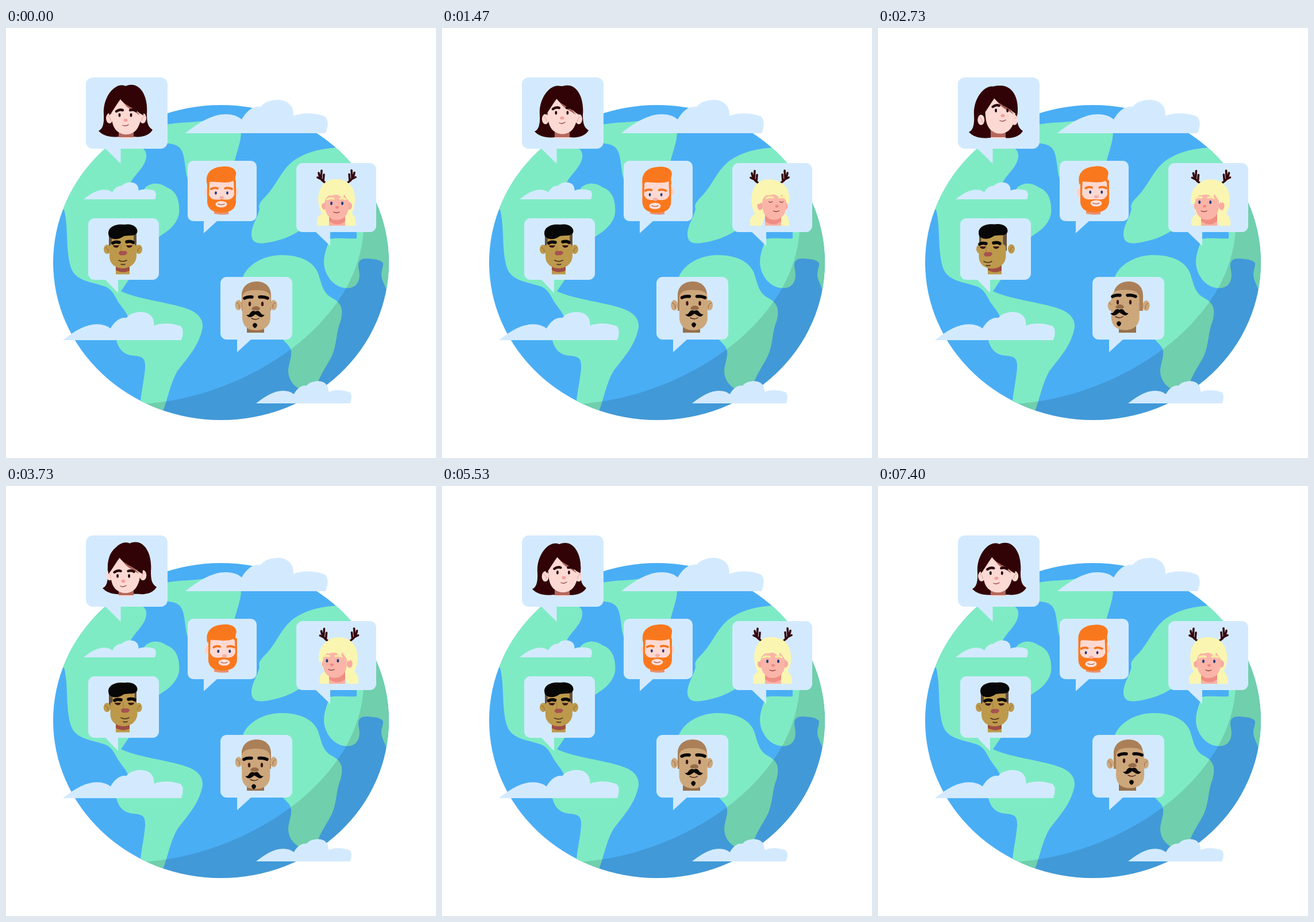
Write an HTML page that moves like this. It is 748x748 px and loops after 7430 ms.

```html
<!DOCTYPE html>
<html lang="en">
<head>
<meta charset="utf-8">
<title>People around the globe</title>
<style>
@property --x { syntax: "<number>"; inherits: true; initial-value: 0; }
@property --y { syntax: "<number>"; inherits: true; initial-value: 0; }
@property --h { syntax: "<number>"; inherits: true; initial-value: 0; }
@property --e { syntax: "<number>"; inherits: true; initial-value: 1; }

html, body { margin: 0; width: 100%; height: 100%; overflow: hidden; background: #fff; }
svg { display: block; width: 100%; height: 100%; }

/* x, y: where the head looks; h: hair shift; e: eye opening */
.head { animation: 7430ms ease-in-out infinite; }
.woman { animation-name: woman; }
.ginger { animation-name: ginger; }
.deer { animation-name: deer; }
.quiff { animation-name: quiff; }
.bald { animation-name: bald; }

/* d, v: how far a layer follows the look */
.layer { transform: translate(calc(var(--x) * var(--d) * 1px), calc(var(--y) * var(--v) * 1px)); }
.ears { --d: -.08; --v: -.35; }
.face { --d: .38; --v: .2; }
.eyes { --d: .85; --v: 1; }
.nose { --d: 1; --v: 1; }
.bald .eyes { --d: .5; }
.quiff .eyes { --d: .75; }
.hair { transform: translate(calc(var(--h) * 1px), calc(var(--y) * -.25px)); }
.open { opacity: var(--e); }
.shut { opacity: calc(1 - var(--e)); }
.line { fill: none; stroke-linecap: round; stroke-linejoin: round; }

@keyframes woman {
  0% { --x: 0; --y: 0; --h: 0; }
  9% { --x: 1; --y: -1; --h: -1; }
  19.8% { --x: 1; --y: -4; --h: 0; }
  28% { --x: 9; --y: -8; --h: -4; }
  36.7% { --x: 9; --y: -8; --h: -3; }
  43% { --x: 6; --y: -5; --h: -1; }
  50.2% { --x: -4; --y: 5; --h: 7; }
  58% { --x: -4; --y: 5; --h: 6.5; }
  65.5% { --x: -2.5; --y: 3; --h: 5; }
  74% { --x: 4; --y: -1; --h: -4; }
  79% { --x: 4; --y: -1; --h: -4; }
  85.2% { --x: 1.5; --y: 0; --h: 0; }
  99.6%, 100% { --x: -2; --y: 0; --h: 3; }
}
@keyframes ginger {
  0%, 8% { --x: 0; --y: 0; }
  17%, 23% { --x: -4; --y: 3; }
  31%, 40% { --x: 5; --y: -1.5; }
  50.2%, 56% { --x: 5; --y: .5; }
  63%, 67% { --x: -3; --y: -2.5; }
  76%, 90% { --x: 0; --y: 0; }
  97%, 100% { --x: -4; --y: 3; }
}
@keyframes deer {
  0%, 10% { --x: 0; --y: 0; --h: 0; --e: 1; }
  16% { --x: 6.5; --y: -2; --h: -5; }
  18% { --e: 1; }
  19.2%, 20.4% { --e: 0; }
  22% { --e: 1; }
  25% { --x: 6.5; --y: -2; --h: -5; }
  32%, 40% { --x: -8; --y: -2; --h: 4.5; }
  50.2%, 56% { --x: -9; --y: -1; --h: 4.5; }
  63%, 67% { --x: 0; --y: 3; --h: 0; }
  75%, 100% { --x: 0; --y: 0; --h: 0; --e: 1; }
}
@keyframes quiff {
  0%, 22% { --x: 0; --y: 0; --h: 0; }
  31%, 40% { --x: -12; --y: 2; --h: -3; }
  50.2% { --x: 4; --y: -1; --h: 0; }
  58%, 67% { --x: 9; --y: -2; --h: 0; }
  78%, 86% { --x: -3; --y: 0; --h: 0; }
  95%, 100% { --x: 0; --y: 0; --h: 0; }
}
@keyframes bald {
  0%, 7% { --x: 0; --y: 0; }
  17%, 23% { --x: 5; --y: -1; }
  31%, 40% { --x: -14; --y: -3; }
  50.2%, 56% { --x: -2; --y: 5.5; }
  64%, 68% { --x: 5; --y: 1.5; }
  78%, 88% { --x: 4; --y: -.5; }
  97%, 100% { --x: 8; --y: -2; }
}
</style>
</head>
<body>
<svg viewBox="0 0 748 748">
  <defs>
    <clipPath id="globe"><ellipse cx="374" cy="408" rx="292" ry="274"/></clipPath>
    <clipPath id="card"><rect x="505" y="235" width="139" height="109"/></clipPath>
    <path id="cloud" d="M0 0C25-20 48-33 70-33Q88-33 98-24Q112-48 131-46C138-55 150-58 162-58C180-57 189-46 188-30C205-37 228-35 243-29C250-22 248-10 244 0Z"/>
    <path id="antler" class="line" stroke="#35080d" stroke-width="3.6" d="M555 269C550 266 545 260 544 252M548 263L542 260M552 266L553 255M548 261L549 248"/>
  </defs>

  <g clip-path="url(#globe)">
    <path fill="#4aaef5" d="M80 130H670V690H80Z"/>
    <g fill="#7febc4">
      <path d="M90 316H101C109 345 103 385 113 417C121 440 146 441 170 449C185 453 189 467 197 479C205 491 220 505 212 520L192 543C196 560 206 569 222 570C239 571 243 576 242 592C240 615 235 632 233 660L270 690L274 664C282 642 286 618 298 597C316 573 336 553 342 521C343 500 327 492 308 486C275 476 235 473 200 458L262 366C280 354 296 345 301 323C303 302 297 283 279 277C264 266 244 270 239 283H218C207 264 240 250 244 225C245 213 239 206 225 207L190 180L80 250Z"/>
      <path d="M270 170C300 162 330 166 357 159L409 175C410 200 400 215 396 240H330L316 263C310 245 313 220 302 208C295 202 288 201 270 200Z"/>
      <path d="M580 208C545 209 520 217 500 231C482 245 475 263 460 283C451 296 437 303 441 315C438 330 426 345 427 360C428 376 441 376 457 373C478 369 495 363 515 350L560 340H610V366C594 367 576 364 563 367C559 380 553 392 553 408C554 430 569 449 588 452C608 455 618 442 614 421C611 408 614 401 627 401C640 402 651 402 656 409C656 419 650 426 655 439L662 456H690V208Z"/>
      <path d="M411 436C419 411 449 395 479 395C511 395 535 406 543 427C550 448 551 461 568 470C585 479 587 491 582 510C574 529 576 550 567 570C558 588 549 599 542 618L515 630C499 624 490 609 491 594C493 578 501 564 492 553L480 540L420 480Z"/>
    </g>
    <path fill="#000" opacity=".12" d="M236 654C340 648 440 605 513 545C580 488 616 425 622 354Q625 290 612 220H690V700H236Z"/>
  </g>

  <g fill="#d3eafe">
    <use href="#cloud" transform="translate(312 183)"/>
    <use href="#cloud" transform="translate(99 543) scale(.843)"/>
    <use href="#cloud" transform="translate(135 298) scale(.508)"/>
    <use href="#cloud" transform="translate(435 653) scale(.67)"/>
    <rect x="139" y="86" width="142" height="124" rx="12"/>
    <path d="M172 209L199.500 236V209Z"/>
    <rect x="316" y="231" width="120" height="105" rx="10"/>
    <path d="M344 335V357L368 335Z"/>
    <rect x="505" y="235" width="139" height="120" rx="11"/>
    <path d="M538 354L564 379V354Z"/>
    <rect x="143" y="331" width="123" height="107" rx="11"/>
    <path d="M172 437L195 461V437Z"/>
    <rect x="373" y="433" width="125" height="109" rx="11"/>
    <path d="M402 541V564L427 541Z"/>
  </g>

  <g class="head woman">
    <path class="hair" fill="#310306" d="M208 101C190 93 168 120 170 150C171 167 168 176 161 179C168 187 182 191 196 189H222C238 191 250 186 255 177C247 172 245 165 245 150C248 116 231 91 208 101Z"/>
    <path fill="#b5685d" d="M196 165H222V190H196Z"/>
    <path fill="#fbd8d3" d="M196 190H222V192H196Z"/>
    <g class="layer ears" fill="#fdd9d4">
      <ellipse cx="180" cy="157" rx="6" ry="9"/>
      <ellipse cx="238" cy="157" rx="6" ry="9"/>
      <path class="line" stroke="#dc9a94" d="M177 153Q182 155 182 161M241 153Q236 155 236 161"/>
    </g>
    <g class="layer face">
      <path fill="#fdd9d4" d="M183 135C183 158 184 172 194 180C203 187 215 187 224 180C233 172 236 158 236 135C230 110 189 110 183 135Z"/>
      <path fill="#a75f58" d="M200 123Q219 132 233 152L224 146Q208 139 200 123Z"/>
      <path fill="#310306" d="M180 152C187 143 192 133 199 124C207 135 222 138 232 148L239 152C243 122 229 101 209 102C187 99 174 126 180 152Z"/>
    </g>
    <g class="layer eyes">
      <path class="line" stroke="#2b0508" stroke-width="4.500" d="M192 145Q198 141 203 143M216 143Q221 141 226 144"/>
      <g fill="#25080c"><ellipse cx="197.500" cy="151.500" rx="1.900" ry="3.200"/><ellipse cx="217.500" cy="151.500" rx="1.900" ry="3.200"/></g>
    </g>
    <g class="layer nose">
      <ellipse cx="208" cy="160.500" rx="3.500" ry="2.700" fill="#f6a09b"/>
      <path class="line" stroke="#8f4744" stroke-width="1.300" d="M203 169Q208 172 213 168"/>
    </g>
  </g>

  <g class="head ginger">
    <path fill="#e99170" d="M362 308H387V324Q374 326 362 323Z"/>
    <g class="layer ears" fill="#fdd3ca">
      <ellipse cx="350" cy="285" rx="4" ry="7"/>
      <ellipse cx="400" cy="285" rx="4" ry="7"/>
    </g>
    <g class="layer face">
      <path fill="#fdd9d2" d="M351 260H399V302Q397 316 375 318Q353 316 351 302Z"/>
      <path fill="#fa781d" d="M350 265H354L353 290C357 300 364 299 375 298C386 299 393 300 397 290L396 265H400V301C400 315 390 321 375 321C360 321 350 315 350 301Z"/>
    </g>
    <path class="layer" style="--d:.1;--v:.2" fill="#fa781d" d="M350 273C345 254 356 242 377 241C391 239 402 246 400 255C399 260 398 262 400 272L395 266C383 272 362 266 354 268Z"/>
    <g class="layer eyes">
      <path class="line" stroke="#f4751f" stroke-width="3.800" d="M357 280Q362 277 368 279M381 279Q387 277 393 280"/>
      <g fill="#263b78"><ellipse cx="365" cy="287" rx="1.900" ry="2.800"/><ellipse cx="385" cy="287" rx="1.900" ry="2.800"/></g>
    </g>
    <g class="layer nose">
      <ellipse cx="375" cy="295" rx="4" ry="2.800" fill="#f5aea7"/>
      <ellipse cx="374.500" cy="306.500" rx="10" ry="5.500" fill="#fde0d8"/>
      <path class="line" stroke="#a85540" stroke-width="1.200" d="M369 306Q375 309 380 306"/>
    </g>
  </g>

  <g class="head deer" clip-path="url(#card)">
    <g class="hair">
      <use href="#antler"/>
      <use href="#antler" transform="matrix(-1 0 0 1 1150 -.5)"/>
      <path fill="#faf6b1" d="M575 263C551 261 540 284 544 307Q546 319 550 323C540 327 540 337 542 346H560L566 329H584L590 346H608C610 337 608 327 601 323Q606 314 607 303C609 280 597 263 575 263Z"/>
    </g>
    <path fill="#ef8d83" d="M562 320H590V346H562Z"/>
    <path fill="#f9b1a4" d="M562 336Q577 347 590 336V346H562Z"/>
    <g class="layer ears" fill="#f7aaa0">
      <ellipse cx="554" cy="309" rx="5" ry="7"/>
      <ellipse cx="597" cy="309" rx="5" ry="7"/>
    </g>
    <g class="layer face">
      <path fill="#fab5a8" d="M555 290H596V312Q595 328 582 333Q575 335 568 333Q556 327 555 312Z"/>
      <path fill="#faf6b1" d="M548 307C545 285 556 267 576 267C596 267 604 286 601 306L594 298L588 289L586 297Q577 288 573 290Q565 292 562 291Q555 296 554 304Z"/>
    </g>
    <g class="layer eyes">
      <path class="line" stroke="#f7eda0" stroke-width="3.500" d="M559 298Q564 295 570 297M581 297Q587 295 591 298"/>
      <g class="open" fill="#28427d"><ellipse cx="566" cy="305" rx="2" ry="3"/><ellipse cx="585" cy="305" rx="2" ry="3"/></g>
      <path class="line shut" stroke="#8b5350" stroke-width="1.300" d="M563 304Q566 307 569 304M582 304Q585 307 588 304"/>
    </g>
    <g class="layer nose">
      <ellipse cx="576" cy="312" rx="3" ry="2.300" fill="#ee8885"/>
      <path class="line" stroke="#923f43" stroke-width="1.300" d="M570 320Q575 323 580 320"/>
    </g>
  </g>

  <g class="head quiff">
    <path fill="#bd994c" d="M191 405H215V428.500H191Z"/>
    <path fill="#9d4d43" d="M191 412H215V422Q203 428 191 421Z"/>
    <path class="hair" fill="#66503c" d="M179 354H227V388H179Z"/>
    <g class="layer ears" fill="#bd994c">
      <ellipse cx="176" cy="385" rx="6" ry="8"/>
      <ellipse cx="231" cy="385" rx="6" ry="8"/>
      <path class="line" stroke="#846531" d="M173 382Q178 383 178 389M234 382Q229 383 229 389"/>
    </g>
    <path class="layer face" fill="#bd994c" d="M184 357H222V375L227 379V397C226 411 215 418 203 418C191 418 180 411 180 397V379L184 375Z"/>
    <path class="hair" fill="#080707" d="M179 362C174 347 190 340 205 342C221 339 231 348 228 356C225 363 214 360 205 362C196 369 184 369 179 362Z"/>
    <g class="layer eyes">
      <path class="line" stroke="#080707" stroke-width="5.500" d="M186 374Q190 371 197 373M210 372Q217 370 221 373"/>
      <path fill="#3d1717" d="M186 378H197Q195 383 191 382Q187 382 186 378ZM209 378H220Q219 382 215 382Q211 383 209 378Z"/>
    </g>
    <g class="layer nose">
      <path class="line" stroke="#a17f3d" d="M200 377V388"/>
      <path fill="#a65350" d="M196 392Q197 387 203 388Q210 387 211 391Q209 396 204 395Q198 397 196 392Z"/>
      <path class="line" stroke="#362017" stroke-width="1.500" d="M196 404Q203 408 210 404M200 411Q204 412 207 411" stroke-opacity=".9"/>
    </g>
  </g>

  <g class="head bald">
    <path fill="#97704c" d="M419 505H449V530H419Z"/>
    <path fill="#ab8058" d="M410 492V465C410 449 422 441 436 441C450 441 462 449 461 468V492Z"/>
    <g class="layer ears" fill="#cda77c">
      <ellipse cx="404.500" cy="482" rx="6" ry="9"/>
      <ellipse cx="465.500" cy="482" rx="6" ry="9"/>
      <path class="line" stroke="#8f6848" d="M401 478Q407 479 406 487M469 478Q463 479 464 487"/>
    </g>
    <path class="layer face" fill="#cda77c" d="M411 470C411 459 420 456 435 456C450 456 460 459 460 470V505C459 520 448 526 435 526C422 526 412 520 411 505Z"/>
    <g class="layer eyes">
      <path class="line" stroke="#080707" stroke-width="5.500" d="M415 470Q420 467 428 468M441 468Q449 467 455 470"/>
      <g fill="#3b1714"><ellipse cx="424" cy="480" rx="2.200" ry="4"/><ellipse cx="446" cy="480" rx="2.200" ry="4"/></g>
    </g>
    <g class="layer nose">
      <path fill="#946a47" d="M427 489Q429 484 435 484Q441 484 442 489Q439 492 435 491Q430 492 427 489Z"/>
      <path fill="#0c0807" d="M434 493Q428 490 424 497Q422 500 418 499Q423 506 430 501L434 498L439 501Q445 506 450 499Q446 500 443 496Q440 490 434 493Z"/>
      <path class="line" stroke="#4b241d" stroke-width="1.500" d="M427 505Q434 509 440 505"/>
      <path fill="#0c0807" d="M429 516Q433 510 437 516Q437 520 433 522Q429 520 429 516Z"/>
    </g>
  </g>
</svg>
</body>
</html>
```
